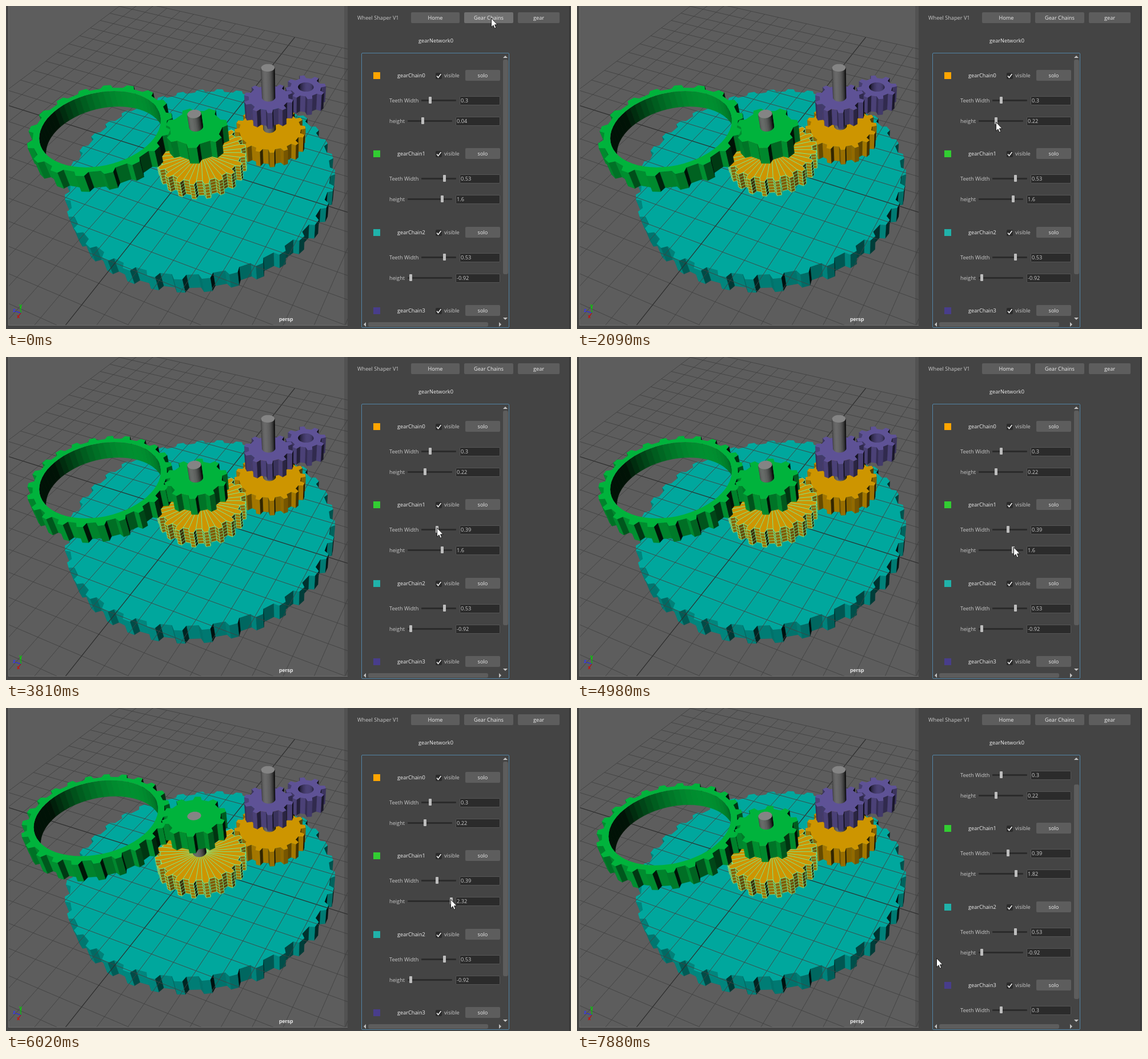
An HTML page with a canvas for the animation above (8 s loop, 989x566 px).

```html
<!DOCTYPE html>
<html lang="en">
<head>
<meta charset="utf-8">
<title>Gear chains</title>
<style>
html, body { margin: 0; width: 100%; height: 100%; overflow: hidden; background: #444; }
#stage { position: absolute; left: 0; top: 0; width: 989px; height: 566px; overflow: hidden;
  font: 9.2px/16px "Open Sans", "Noto Sans", sans-serif; color: #c8c8c8; }
#stage div, #stage svg, canvas { position: absolute; white-space: nowrap; }
.btn { background: #5d5d5d; color: #eee; text-align: center; border-radius: 2px; line-height: 19px; }
.hover { background: #707070; }
.field { box-sizing: border-box; border: 1px solid #555; background: #2b2b2b; border-radius: 2px;
  line-height: 14px; text-indent: 1px; color: #ccc; }
.check { background: #2b2b2b; border-radius: 2px; }
.track { background: #2b2b2b; border-radius: 1px; }
.thumb { background: #bdbdbd; border-radius: 1px; }
.bar { background: #5d5d5d; border-radius: 3px; }
.bright { color: #eee; }
.frame { box-sizing: border-box; border: 1px solid #5285a6; border-radius: 2px; }
.clip { overflow: hidden; }
.edge { background: #2e2e2e; }
.tag { font: bold 9px/16px "Liberation Sans", Arial, sans-serif; color: #f2f2f2; }
</style>
</head>
<body>
<div id="stage"><canvas id="view" width="598" height="566"></canvas></div>
<script>
const stage = document.getElementById('stage');
const ctx = document.getElementById('view').getContext('2d');
const { sin, cos, PI, hypot, max, min, round, floor } = Math;

// ---- motion: key poses in ticks, linear in between, shown once per tick ----
const LOOP = 8000, TICK = LOOP / 61;

function pose(keys, tick) {
  const next = keys.findIndex(k => k[0] > tick);
  if (next === 0) return keys[0].slice(1);
  if (next < 0) return keys[keys.length - 1].slice(1);
  const a = keys[next - 1], b = keys[next], f = (tick - a[0]) / (b[0] - a[0]);
  return a.slice(1).map((v, i) => +(v + (b[i + 1] - v) * f).toFixed(2));
}

const cursorKeys = [
  [3, 849, 21], [6, 653, 226], [8, 732, 202], [18, 733, 203], [19, 725, 190], [20, 725, 290],
  [23, 751, 305], [25, 761, 300], [29, 754, 299], [31, 745, 300], [35, 754, 299], [38, 764, 333],
  [45, 763, 334], [46, 778, 335], [48, 780, 335], [51, 768, 335], [53, 768, 335],
  [55, 613, 409], [58, 617, 426], [60, 629, 438]
];
const orangeHeight = [[10, .04], [16, .22]];
const greenWidth = [[26, .53], [29, .39], [31, .3], [35, .39]];
const greenHeight = [[39, 1.6], [42, 1.24], [45, 1.56], [46, 2.32], [48, 2.32], [51, 1.82]];
const scrollKeys = [[58, 0], [60, 48]];

// ---- camera: r = right, g = away, y = up ----
const F = 953, PITCH = 44.3 * PI / 180, YAW = 23.3 * PI / 180;
const sp = sin(PITCH), cp = cos(PITCH);

function project(r, g, y) {
  const z = 25 + g * cp - y * sp;
  return [490 + F * (r - 3.88) / z, 283 + F * (-.25 - g * sp - y * cp) / z];
}

function trace(points) {
  points.forEach((p, i) => i ? ctx.lineTo(...p) : ctx.moveTo(...p));
  ctx.closePath();
}

function segment(a, b) {
  ctx.beginPath();
  ctx.moveTo(...a);
  ctx.lineTo(...b);
  ctx.stroke();
}

const tint = (c, k) => `rgb(${c.map(v => round(v * k))})`;

function circle(r, g, radius, n) {
  return Array.from({ length: n }, (_, i) => {
    const a = i * 2 * PI / n;
    return [r + radius * cos(a), g + radius * sin(a)];
  });
}

const DEPTH = .22, TOP = .5, BOTTOM = -.4;

function toothed({ r, g, R, w, phase }) {
  const n = round(PI * (R - .15) / w), step = 2 * PI / n, points = [];
  for (let i = 0; i < n; i++) {
    const a = (phase - 90) * PI / 180 + i * step;
    for (const [k, rad] of [[-.27, R - DEPTH], [-.15, R], [.15, R], [.27, R - DEPTH]])
      points.push([r + rad * cos(a + k * step), g + rad * sin(a + k * step)]);
  }
  return points;
}

function walls(outline, low, high, color, wire) {
  const faces = [];
  outline.forEach((p, i) => {
    const q = outline[(i + 1) % outline.length];
    const P = project(...p, high), Q = project(...q, high), B = project(...q, low), A = project(...p, low);
    if ((Q[0] - P[0]) * (B[1] - Q[1]) - (Q[1] - P[1]) * (B[0] - Q[0]) <= 0) return;
    const dr = q[0] - p[0], dg = q[1] - p[1];
    const light = max(0, (-.35 * dg + .94 * dr) / hypot(dr, dg));
    faces.push({ p, q, quad: [P, Q, B, A], depth: p[1] + q[1], fill: tint(color, .1 + .7 * light) });
  });
  faces.sort((a, b) => b.depth - a.depth);
  for (const f of faces) {
    ctx.beginPath();
    trace(f.quad);
    ctx.fillStyle = ctx.strokeStyle = f.fill;
    ctx.lineWidth = .6;
    ctx.fill();
    ctx.stroke();
    if (!wire) continue;
    ctx.strokeStyle = wire;
    ctx.lineWidth = .8;
    for (let k = 0; k <= 5; k++) {
      const y = low + (high - low) * k / 5;
      segment(project(...f.p, y), project(...f.q, y));
    }
    segment(f.quad[0], f.quad[3]);
    segment(f.quad[1], f.quad[2]);
  }
}

function cap(outlines, y, color) {
  ctx.beginPath();
  outlines.forEach(o => trace(o.map(p => project(...p, y))));
  ctx.fillStyle = tint(color, 1);
  ctx.fill('evenodd');
}

function bore(hole, low, high, color) {
  ctx.save();
  ctx.beginPath();
  trace(hole.map(p => project(...p, high)));
  ctx.clip();
  walls(hole.slice().reverse(), low, high, color);
  ctx.restore();
}

function spokes(gear, outline, y) {
  ctx.strokeStyle = gear.wire;
  ctx.lineWidth = .9;
  ctx.beginPath();
  trace(outline.map(p => project(...p, y)));
  ctx.stroke();
  const hub = project(gear.r, gear.g, y);
  outline.filter((_, i) => i % 4 % 3 === 0).forEach(p => segment(hub, project(...p, y)));
}

// Gears of one chain share a height, so walls come first and faces last.
function chain(gears, h, w, color) {
  const low = h + BOTTOM, high = h + TOP;
  const parts = gears.map(gear => ({
    gear,
    outline: toothed({ ...gear, w }),
    hole: gear.hole && circle(gear.r, gear.g, gear.hole, 60)
  }));
  for (const { gear, outline, hole } of parts) {
    walls(outline, low, high, color, gear.wire);
    if (hole) bore(hole, low, high, color);
  }
  for (const { gear, outline, hole } of parts) {
    cap(hole ? [outline, hole] : [outline], high, color);
    if (gear.wire) spokes(gear, outline, high);
  }
}

const GREY = [132, 132, 132];
function shaft(r, g, low, high) {
  const rim = circle(r, g, .29, 28);
  if (high > low) walls(rim, low, high, GREY);
  cap([rim], high, GREY);
}

function grid() {
  const spot = (a, b) => project(a * cos(YAW) + b * sin(YAW) - .33, b * cos(YAW) - a * sin(YAW) - .12, 0);
  for (let k = -12; k <= 12; k++) {
    ctx.strokeStyle = k ? '#424242' : '#2c2c2c';
    ctx.lineWidth = k ? .9 : 1.2;
    segment(spot(k, -12), spot(k, 12));
    segment(spot(-12, k), spot(12, k));
  }
}

const TEAL = [0, 167, 157], ORANGE = [205, 149, 0], GREEN = [0, 179, 60], PURPLE = [94, 82, 150];
const plate = { r: 0, g: .05, R: 6.15, phase: 7.5 };
const yellowGear = { r: .04, g: .06, R: 2.03, phase: -5, wire: '#76f39c' };
const orangeGear = { r: 3.13, g: 1.72, R: 1.68, phase: 4 };
const bigPurple = { r: 3.1, g: 1.72, R: 1.12, phase: 4 };
const smallPurple = { r: 4.8, g: 2.52, R: .93, phase: 10, hole: .36 };
const ring = { r: -4.12, g: .05, R: 3.04, phase: -2, hole: 2.55 };
const smallGreen = { r: 0, g: 0, R: 1.35, phase: 0 };

function drawScene(h0, w1, h1) {
  ctx.fillStyle = '#444';
  ctx.fillRect(0, 0, 598, 566);
  ctx.save();
  ctx.beginPath();
  ctx.rect(5, 0, 593, 559);
  ctx.clip();
  ctx.fillStyle = '#5d5d5d';
  ctx.fillRect(5, 0, 593, 559);
  chain([plate], -.92, .53, TEAL);
  grid();
  chain([orangeGear, yellowGear], h0, .3, ORANGE);
  shaft(3.1, 1.72, h0 + TOP, 1.5);
  shaft(0, 0, h0 + TOP, max(h0 + TOP, h1 + BOTTOM));
  chain([smallPurple, bigPurple], 1.89, .3, PURPLE);
  shaft(3.1, 1.72, 2.39, 3.98);
  chain([ring, smallGreen], h1, w1, GREEN);
  shaft(0, 0, h1 + TOP, 2.82);
  ctx.lineWidth = 1.2;
  [['#0c0', 26, 527], ['#22f', 17, 535], ['#c00', 22, 543]].forEach(([c, x, y]) => {
    ctx.strokeStyle = c;
    segment([26, 538], [x, y]);
  });
  ctx.fillStyle = 'rgba(50,50,50,.25)';
  ctx.fillRect(592, 0, 6, 559);
  ctx.restore();
  ctx.fillStyle = '#707070';
  ctx.fillRect(4, 0, 1, 560);
  ctx.fillRect(4, 559, 594, 1);
}

// ---- panel ----
function box(cls, x, y, w, h, text = '', parent = stage) {
  const e = document.createElement('div');
  e.className = cls;
  e.style.cssText = `left:${x}px;top:${y}px;width:${w}px;height:${h}px`;
  e.textContent = text;
  parent.append(e);
  return e;
}

const label = (text, x, y, parent, cls = '') => box(cls, x, y - 8, 120, 16, text, parent);

function shape(x, y, w, h, body, parent = stage) {
  const holder = box('', x, y, w, h, '', parent);
  holder.innerHTML = `<svg width="${w}" height="${h}" style="left:0;top:0;overflow:visible">${body}</svg>`;
  return holder;
}

label('Wheel Shaper V1', 615, 21);
box('btn', 709, 11, 85, 19, 'Home');
const chainsButton = box('btn', 802, 11, 86, 19, 'Gear Chains');
box('btn', 896, 11, 73, 19, 'gear');
label('gearNetwork0', 722, 61, stage, 'bright');
box('frame', 622, 82, 259, 482);
box('edge', 986, 0, 1, 566);
label('persp', 478, 549, stage, 'tag');
[['y', 23, 525, '#0d0'], ['z', 12, 533, '#33f'], ['x', 19, 544, '#d00']].forEach(([s, x, y, c]) => {
  label(s, x, y, stage, 'tag').style.color = c;
});

const clip = box('clip', 623, 83, 246, 469);
const list = box('', -623, -83, 989, 700, '', clip);

const heightX = h => 728.2 + 21.9 * h;
const widthX = w => min(742 + 144 * (w - .3), 721.5 + 86 * w);

function slider(name, toX, y, from, to, fieldX) {
  label(name, 671, y, list);
  box('track', from, y - 2, to - from, 3, '', list);
  const thumb = box('thumb', 0, y - 7, 5, 12, '', list);
  const field = box('field', fieldX, y - 8, 865 - fieldX, 16, '', list);
  return v => {
    thumb.style.left = round(toX(v) - 2.5) + 'px';
    field.textContent = String(v);
  };
}

const rows = ['#ffa500', '#32cd32', '#20b2aa', '#483d8b'].map((color, i) => {
  const y = 122 + round(137.4 * i);
  box('', 643, y - 6, 12, 12, '', list).style.background = color;
  label('gearChain' + i, 685, y, list, 'bright');
  box('check', 752, y - 5, 11, 11, '', list);
  shape(752, y - 5, 11, 11, '<path d="M2 5.5 4.5 8.5 9.5 2" fill="none" stroke="#eee" stroke-width="1.6"/>', list);
  label('visible', 767, y, list);
  box('btn', 804, y - 10, 61, 19, 'solo', list);
  return {
    width: slider('Teeth Width', widthX, y + 44, 727, 788, 794),
    height: slider('height', heightX, y + 80, 703, 781, 787)
  };
});
[.3, .53, .53, .3].forEach((w, i) => rows[i].width(w));
[.04, 1.6, -.92, 1.89].forEach((h, i) => rows[i].height(h));

const vbar = box('bar', 870, 94, 9, 376);
box('bar', 634, 554, 210, 8);
[[874, 89, 0], [874, 548, 180], [628, 558, -90], [865, 558, 90]].forEach(([x, y, turn]) =>
  shape(x, y, 1, 1, `<path d="M-4 2 0-2 4 2z" fill="#c4c4c4" transform="rotate(${turn})"/>`));

const cursor = shape(0, 0, 12, 19,
  '<path d="M.5.5V16L4 12.7 6.3 18.2 8.8 17.1 6.5 11.8H11.2z" fill="#fff" stroke="#111" stroke-width=".9"/>');

let drawn = '';
function frame(now) {
  const tick = floor((now % LOOP + 16) / TICK);
  const [h0] = pose(orangeHeight, tick), [w1] = pose(greenWidth, tick), [h1] = pose(greenHeight, tick);
  const [scroll] = pose(scrollKeys, tick), [x, y] = pose(cursorKeys, tick);
  const key = [h0, w1, h1].join();
  if (key !== drawn) {
    drawn = key;
    drawScene(h0, w1, h1);
    rows[0].height(h0);
    rows[1].width(w1);
    rows[1].height(h1);
  }
  cursor.style.transform = `translate(${round(x)}px,${round(y)}px)`;
  list.style.transform = `translateY(${-scroll}px)`;
  vbar.style.transform = `translateY(${scroll * 5 / 6}px)`;
  chainsButton.classList.toggle('hover', tick < 4);
  requestAnimationFrame(frame);
}
frame(performance.now());
</script>
</body>
</html>
```
